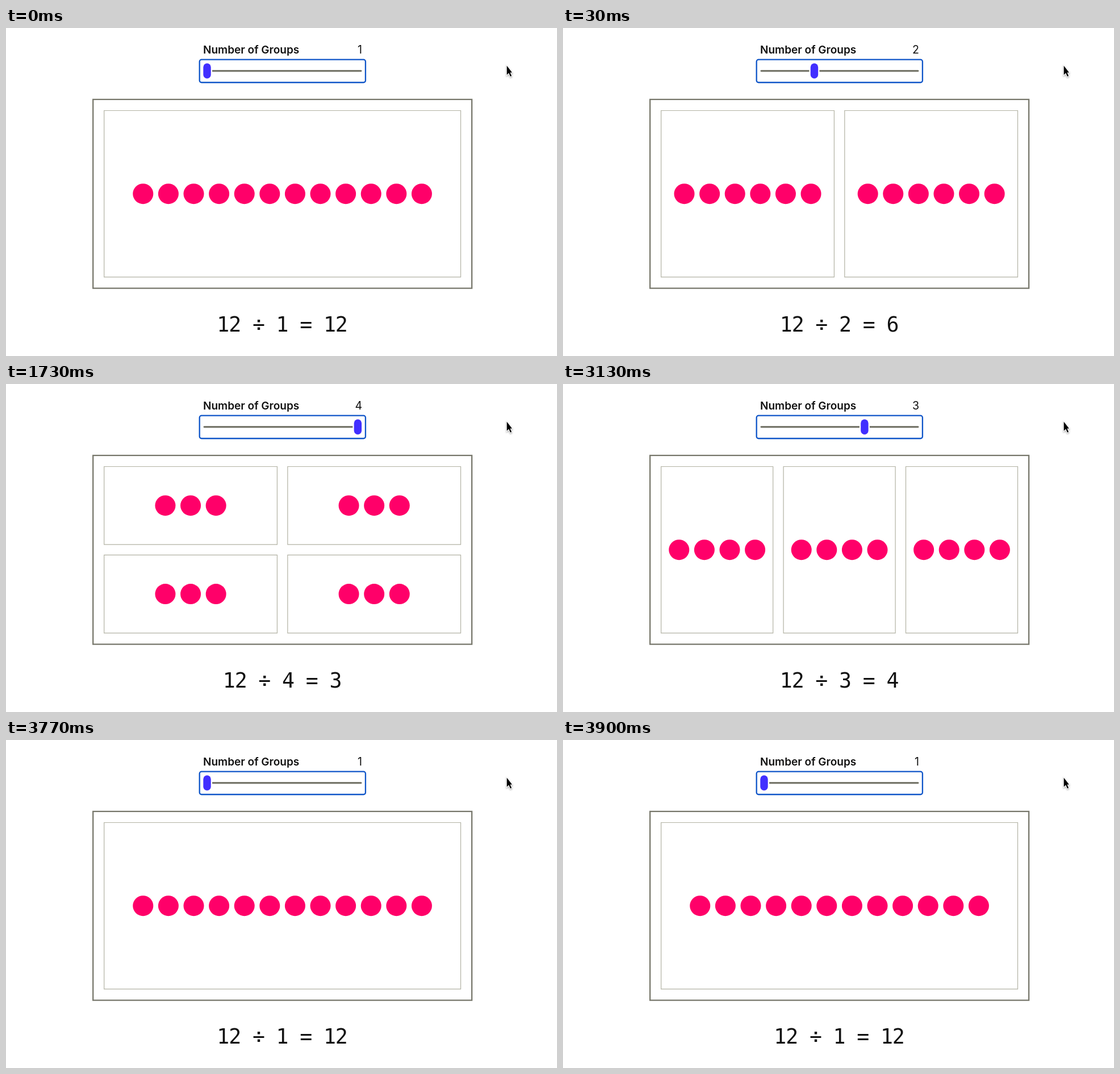
An HTML page with a canvas for the animation above (4.63 s loop, 970 px wide and 578 px high).

```html
<!DOCTYPE html>
<html lang="en">
<head>
<meta charset="utf-8">
<title>Division with groups</title>
<style>
html, body { margin: 0; width: 100%; height: 100%; overflow: hidden; background: #fff; }
canvas { display: block; }
</style>
</head>
<body>
<canvas id="stage" width="970" height="578"></canvas>
<script>
const ctx = document.getElementById('stage').getContext('2d');
const LOOP = 4630;
const TOTAL = 12;
const CENTER = 486.6;
const INK = '#111111', OLIVE = '#77776b', CELL_LINE = '#b2b2a3';
const BLUE = '#0f55c8', VIOLET = '#412fff', PINK = '#ff0069';

// [start time in ms, number of groups]
const STEPS = [[0, 1], [30, 2], [830, 3], [1730, 4], [3130, 3], [3530, 2], [3770, 1]];

function groupsAt(time) {
  return STEPS.filter(([start]) => start <= time).pop()[1];
}

function strokeBox(x, y, w, h, width, color, radius = 0) {
  ctx.beginPath();
  ctx.roundRect(x, y, w, h, radius);
  ctx.lineWidth = width;
  ctx.strokeStyle = color;
  ctx.stroke();
}

function fillBox(x, y, w, h, radius, color) {
  ctx.beginPath();
  ctx.roundRect(x, y, w, h, radius);
  ctx.fillStyle = color;
  ctx.fill();
}

function drawText(text, x, y, font, align) {
  ctx.font = font;
  ctx.textAlign = align;
  ctx.fillStyle = INK;
  ctx.fillText(text, x, y);
}

function drawSlider(groups) {
  drawText('Number of Groups', 347, 45, '600 19px Inter, sans-serif', 'left');
  drawText(groups, 627, 45, '400 19.5px Inter, sans-serif', 'right');
  strokeBox(340.7, 55.7, 292.2, 40.3, 2.3, BLUE, 3.5);
  const thumb = 354 + (groups - 1) * 88.45;
  fillBox(347.5, 73.9, 279, 3.4, 1.7, OLIVE);
  fillBox(thumb - 9, 60, 18, 31, 9, '#fff');
  fillBox(thumb - 6.7, 62.2, 13.4, 26.8, 6.7, VIOLET);
}

function drawCell(x, y, w, h, count) {
  strokeBox(x, y, w, h, 1.2, CELL_LINE);
  ctx.fillStyle = PINK;
  for (let i = 0; i < count; i++) {
    ctx.beginPath();
    ctx.arc(x + w / 2 + (i - (count - 1) / 2) * 44.6, y + h / 2, 18, 0, Math.PI * 2);
    ctx.fill();
  }
}

function drawBoard(groups) {
  strokeBox(153.2, 125.9, 666.9, 332.8, 2.3, OLIVE);
  const columns = groups === 4 ? 2 : groups;
  const rows = groups / columns;
  const gap = 18.4;
  const w = (627.8 - gap * (columns - 1)) / columns;
  const h = (293.3 - gap * (rows - 1)) / rows;
  for (let i = 0; i < groups; i++) {
    const column = i % columns, row = Math.floor(i / columns);
    drawCell(172.7 + column * (w + gap), 145.5 + row * (h + gap), w, h, TOTAL / groups);
  }
}

function drawEquation(groups) {
  const chars = [...`${TOTAL} ÷ ${groups} = ${TOTAL / groups}`];
  chars.forEach((char, i) => {
    const x = CENTER + (i - (chars.length - 1) / 2) * 20.85;
    drawText(char, x, 535, '36.5px "DejaVu Sans Mono", monospace', 'center');
  });
}

function drawCursor() {
  const arrow = new Path2D('M881.7 66.5V82.6L885.2 79.3L887.9 85.6L890.1 84.6L887.4 78.4H891Z');
  ctx.save();
  ctx.shadowColor = 'rgba(0, 0, 0, 0.35)';
  ctx.shadowBlur = 3;
  ctx.shadowOffsetY = 1.5;
  ctx.lineWidth = 2;
  ctx.strokeStyle = '#fff';
  ctx.stroke(arrow);
  ctx.restore();
  ctx.fillStyle = '#000';
  ctx.fill(arrow);
}

function draw(now) {
  const groups = groupsAt(now % LOOP);
  ctx.fillStyle = '#fff';
  ctx.fillRect(0, 0, 970, 578);
  drawSlider(groups);
  drawBoard(groups);
  drawEquation(groups);
  drawCursor();
}

const begin = performance.now();
function tick() {
  draw(performance.now() - begin);
  requestAnimationFrame(tick);
}
tick();
</script>
</body>
</html>
```
